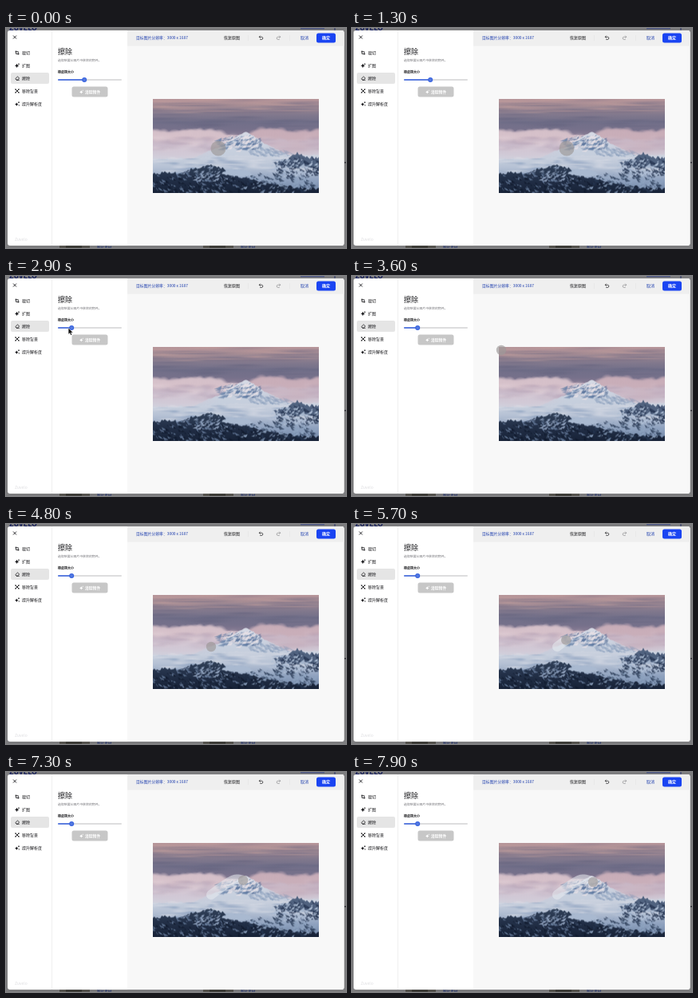
Write an HTML page with a canvas that moves like this. It is 426 px wide and 276 px high and loops after 8000 ms.

```html
<!DOCTYPE html>
<html lang="zh-CN">
<head>
<meta charset="utf-8">
<title>擦除</title>
<style>
html, body { margin: 0; width: 100%; height: 100%; overflow: hidden; background: #7d7d7f; }
canvas { display: block; width: 426px; height: 276px; }
</style>
</head>
<body>
<canvas id="stage"></canvas>
<script>
const W = 426, H = 276, LOOP = 8000, STEP = 100;
const FONT = '"Noto Sans CJK SC", "Noto Sans CJK", "Noto Sans", sans-serif';
const PHOTO = { x: 184, y: 89, w: 208, h: 117.5 };
const INK = '#17171a', BLUE = '#1a44f2', LINK = '#1f3fae';
const scale = Math.max(1, window.devicePixelRatio || 1);

function layer(w, h) {
  const cv = document.createElement('canvas');
  cv.width = w * scale;
  cv.height = h * scale;
  const c = cv.getContext('2d');
  c.scale(scale, scale);
  return c;
}

function random(seed) {
  return () => (seed = (seed * 16807) % 2147483647) / 2147483647;
}

function box(c, x, y, w, h, fill, r = 0) {
  c.fillStyle = fill;
  c.beginPath();
  c.roundRect(x, y, w, h, r);
  c.fill();
}

function disc(c, x, y, r, fill) {
  c.fillStyle = fill;
  c.beginPath();
  c.arc(x, y, r, 0, Math.PI * 2);
  c.fill();
}

function label(c, str, x, y, size, fill, weight = 400) {
  c.font = `${weight} ${size}px ${FONT}`;
  c.textBaseline = 'middle';
  c.fillStyle = fill;
  c.fillText(str, x, y);
}

function lines(c, d, color, width = 0.8) {
  c.strokeStyle = color;
  c.lineWidth = width;
  c.stroke(new Path2D(d));
}

function spark(c, x, y, r, fill) {
  c.save();
  c.translate(x, y);
  c.scale(r, r);
  c.fillStyle = fill;
  c.fill(new Path2D('M0-1Q.2-.2 1 0Q.2.2 0 1Q-.2.2-1 0Q-.2-.2 0-1Z'));
  c.restore();
}

function strip(c, y0, y1, ...colors) {
  const g = c.createLinearGradient(0, y0, 0, y1);
  colors.forEach((col, i) => g.addColorStop(i / (colors.length - 1), col));
  return g;
}

// Soft ellipse; core is the share of the radius that stays solid
function puff(c, x, y, rx, ry, rgb, a, core = 0) {
  c.save();
  c.translate(x, y);
  c.scale(rx, ry);
  const g = c.createRadialGradient(0, 0, core, 0, 0, 1);
  g.addColorStop(0, `rgba(${rgb},${a})`);
  g.addColorStop(1, `rgba(${rgb},0)`);
  c.fillStyle = g;
  c.fillRect(-1, -1, 2, 2);
  c.restore();
}

// Closed shape with ragged edges
function crag(c, pts, rough, fill, rnd) {
  c.fillStyle = fill;
  c.beginPath();
  pts.forEach(([x0, y0], i) => {
    const [x1, y1] = pts[(i + 1) % pts.length];
    const n = Math.max(1, Math.round(Math.hypot(x1 - x0, y1 - y0) / 2));
    for (let k = 0; k < n; k++)
      c.lineTo(x0 + (x1 - x0) * k / n, y0 + (y1 - y0) * k / n + (rnd() - 0.5) * rough);
  });
  c.fill();
}

// Small slanted flakes of rock or snow scattered over an ellipse
function flakes(c, n, x, y, rx, ry, size, fill, slant, rnd) {
  c.fillStyle = fill;
  for (let i = 0; i < n; i++) {
    const a = rnd() * 6.28, d = Math.sqrt(rnd()), s = size * (0.4 + rnd());
    const px = x + Math.cos(a) * d * rx, py = y + Math.sin(a) * d * ry;
    c.beginPath();
    c.moveTo(px, py);
    c.lineTo(px + s * slant, py + s * 0.7);
    c.lineTo(px + s * slant * 0.3, py + s * 0.8);
    c.fill();
  }
}

function paintSky(c, w, rnd) {
  c.fillStyle = strip(c, 0, 48, '#b8969a', '#9f8993', '#83798d', '#716f89', '#77718b', '#8f8299');
  c.fillRect(0, 0, w, 60);
  for (let i = 0; i < 34; i++)
    puff(c, rnd() * w, 1 + rnd() * 16, 22 + rnd() * 38, 1 + rnd() * 2,
      i % 2 ? '206,165,159' : '112,105,130', 0.4);
  for (let i = 0; i < 18; i++)
    puff(c, rnd() * w, 18 + rnd() * 16, 20 + rnd() * 30, 1 + rnd() * 2, '95,95,123', 0.3);
}

function paintClouds(c, w, rnd) {
  c.fillStyle = strip(c, 42, 88, '#c6b0bd', '#cabbca', '#d1cfdb', '#c4cddc');
  c.fillRect(0, 45, w, 45);
  for (let x = -4; x < w + 6; x += 3.5) {
    const dip = 6 * Math.exp(-(((x - 105) / 22) ** 2));
    const top = 43 + dip + Math.sin(x / 13) * 1.8 + rnd() * 3;
    puff(c, x, top, 6 + rnd() * 5, 5 + rnd() * 4, x < 100 ? '214,193,202' : '201,174,185', 0.9, 0.4);
  }
  for (let i = 0; i < 70; i++) {
    const x = rnd() * w;
    puff(c, x, 47 + rnd() * 18, 6 + rnd() * 14, 2 + rnd() * 4,
      i % 2 ? '177,157,178' : x < 110 ? '224,207,214' : '208,185,196', 0.4);
  }
}

function paintPeak(c, rnd) {
  crag(c, [[42, 78], [68, 66], [84, 60], [99, 50], [110, 44], [118, 41], [126, 46], [140, 56],
    [162, 66], [190, 80]], 1.2, strip(c, 41, 80, '#d8dbe6', '#c9d1df', '#c2ccdb'), rnd);
  flakes(c, 70, 107, 53, 25, 8, 5, 'rgba(96,124,164,.55)', -1.6, rnd);
  flakes(c, 45, 123, 53, 16, 9, 4, 'rgba(82,108,149,.55)', -1.2, rnd);
  flakes(c, 40, 112, 53, 25, 10, 4, 'rgba(235,226,231,.7)', -1.7, rnd);
  flakes(c, 40, 145, 66, 28, 8, 5, 'rgba(129,151,184,.5)', 1.8, rnd);
  puff(c, 35, 66, 48, 11, '211,201,214', 0.8);
  puff(c, 182, 60, 42, 11, '200,179,192', 0.85);
}

function paintGround(c, w, rnd) {
  crag(c, [[0, 75], [50, 74], [100, 71], [150, 72], [w, 70], [w, 120], [0, 120]], 2,
    strip(c, 70, 118, '#ced4e0', '#b5c1d4', '#8ea1be', '#6d83a4'), rnd);
  for (let i = 0; i < 60; i++)
    puff(c, rnd() * w, 73 + rnd() * 20, 6 + rnd() * 16, 0.8 + rnd() * 2,
      i % 2 ? '126,149,184' : '223,225,233', 0.5);

  // Rocky shoulder on the right
  crag(c, [[150, 81], [168, 75], [181, 68], [193, 73], [208, 74], [208, 88], [190, 85], [172, 87]],
    4, '#50627f', rnd);
  flakes(c, 90, 183, 84, 32, 13, 5, 'rgba(39,54,81,.75)', 1.2, rnd);
  flakes(c, 90, 178, 84, 32, 12, 4, 'rgba(174,190,212,.8)', -1.2, rnd);

  // Dark foreground on the left, thinning out to the lower right
  crag(c, [[0, 94], [15, 91], [30, 93], [48, 87], [63, 84], [77, 83], [89, 88], [98, 95], [115, 98],
    [132, 104], [155, 107], [185, 111], [208, 112], [208, 120], [0, 120]], 4,
    strip(c, 83, 117, '#304058', '#222f47', '#182338'), rnd);
  flakes(c, 70, 158, 101, 46, 13, 5, 'rgba(39,55,82,.7)', 1.3, rnd);
  flakes(c, 80, 160, 104, 48, 13, 4, 'rgba(143,164,193,.7)', -1.3, rnd);
  flakes(c, 100, 45, 104, 60, 14, 4, 'rgba(122,145,178,.65)', 1.4, rnd);
  flakes(c, 45, 72, 92, 34, 9, 4, 'rgba(159,178,205,.75)', -1.4, rnd);
  flakes(c, 100, 60, 107, 70, 13, 4, 'rgba(18,28,46,.8)', 1.1, rnd);
  crag(c, [[84, 94], [96, 88], [114, 88], [127, 95], [112, 97]], 2, '#a9b9d0', rnd);
}

function paintPhoto() {
  const { w, h } = PHOTO, c = layer(w, h), rnd = random(417);
  paintSky(c, w, rnd);
  paintClouds(c, w, rnd);
  paintPeak(c, rnd);
  paintGround(c, w, rnd);
  return c.canvas;
}

function paintBackdrop(c) {
  box(c, 0, 0, W, H, '#7d7d7f');
  label(c, 'ZUVELO', 4, 0, 9, '#17205c', 800);
  box(c, 369, 0, 30, 1.4, '#4c5684');
  box(c, 411.5, 0, 1, 3, '#26306a');
  for (const x of [67, 247]) {
    box(c, x, 273, 38, 3, '#55534e');
    box(c, x + 8, 273, 20, 3, '#3d3c38');
    label(c, '图片素材', x + 47, 275, 4.6, '#24346f', 500);
  }
  box(c, 424, 168, 2, 1.5, '#34343a');
}

function paintSidebar(c) {
  lines(c, 'M9 9.5L13 13.5M13 9.5L9 13.5', INK, 0.9);
  box(c, 57, 3, 0.8, 270, '#ededed');
  box(c, 6, 56, 48, 14, '#e5e5e5', 2);
  ['裁切', '扩图', '擦除', '移除背景', '提升解析度'].forEach((s, i) =>
    label(c, s, 20, 31 + i * 16, 5, INK, 500));
  lines(c, 'M12.5 28.5V32.5H16.5M11.5 29.7H15.3V33.7', INK);
  spark(c, 13.6, 47.3, 2.6, INK);
  spark(c, 16, 45.2, 1.1, INK);
  lines(c, 'M11.8 63.6L14.5 61L16.7 63L14.3 65.2H13ZM13 65.3H16.8', INK);
  lines(c, 'M12 77L16 81M16 77L12 81', INK, 0.9);
  for (const [x, y] of [[12, 77], [16, 77], [12, 81], [16, 81]]) disc(c, x, y, 0.8, INK);
  spark(c, 13.3, 95.8, 2.2, INK);
  spark(c, 16, 93.2, 1.2, INK);
  spark(c, 16.2, 97, 1, INK);
  label(c, 'Zuvelo', 11, 265, 5, '#dcdcdf', 500);
}

function paintPanel(c) {
  label(c, '擦除', 65, 30, 9, INK, 500);
  label(c, '选取想要从图片中移除的物件。', 65, 41, 3.9, '#77777c');
  label(c, '橡皮擦大小', 65, 55.5, 4, INK, 700);
  box(c, 82.5, 73.5, 45, 13, '#c7c7c7', 2.5);
  spark(c, 94.3, 80.4, 2.1, '#fff');
  spark(c, 96.2, 78.3, 0.9, '#fff');
  label(c, '清除物件', 99, 80, 4.8, '#fff', 700);
}

function paintEditor(c) {
  box(c, 152, 3, 271.5, 270, '#f8f8f8', [0, 3, 3, 0]);
  box(c, 152, 3, 271.5, 19.5, '#efefef', [0, 3, 0, 0]);
  label(c, '目标图片分辨率：3000 x 1687', 163, 12.3, 4.85, LINK, 500);
  label(c, '恢复原图', 273, 12.3, 5, INK, 500);
  box(c, 303, 9, 0.6, 7, '#e2e2e2');
  box(c, 355, 9, 0.6, 7, '#e2e2e2');
  lines(c, 'M318.7 9.7L317.2 11.2L318.7 12.7M317.2 11.2H320.2A1.6 1.6 0 0 1 320.2 14.4H318.2', INK, 0.7);
  lines(c, 'M342.3 9.7L343.8 11.2L342.3 12.7M343.8 11.2H340.8A1.6 1.6 0 0 0 340.8 14.4H342.8', '#8c8c8f', 0.7);
  label(c, '取消', 369, 12.3, 5, LINK, 500);
  box(c, 389, 6.5, 24, 12, BLUE, 2.5);
  label(c, '确定', 396, 12.3, 5, '#fff', 700);
  c.drawImage(paintPhoto(), PHOTO.x, PHOTO.y, PHOTO.w, PHOTO.h);
}

function paintScene() {
  const c = layer(W, H);
  paintBackdrop(c);
  box(c, 2, 3, 421.5, 270, '#fff', 3);
  paintSidebar(c);
  paintPanel(c);
  paintEditor(c);
  return c.canvas;
}

// Pointer stops: time, x, y
const PATH = [
  [0, 266, 151], [400, 269, 151], [1300, 269, 151], [2000, 95, 66], [2300, 95, 66],
  [2900, 79, 66], [3200, 79, 66], [3600, 187, 93], [4100, 257, 154], [4800, 257, 154],
  [6600, 286, 135], [7900, 302, 138], [8000, 302, 138]
];
const DRAG = [2300, 2900], PAINT_START = 4800;

// Speed through a stop; zero when the pointer rests before or after it
function speed(i, axis) {
  const a = PATH[i - 1], b = PATH[i], c = PATH[i + 1];
  const still = (p, q) => p[1] === q[1] && p[2] === q[2];
  if (!a || !c || still(a, b) || still(b, c)) return 0;
  return (c[axis] - a[axis]) / (c[0] - a[0]);
}

function pointer(t) {
  const i = PATH.findIndex((p, k) => k && t <= p[0]);
  const a = PATH[i - 1], b = PATH[i], span = b[0] - a[0];
  const u = (t - a[0]) / span, v = 1 - u;
  return [1, 2].map(k =>
    a[k] * v * v * (1 + 2 * u) + b[k] * u * u * (1 + 2 * v) +
    span * u * v * (speed(i - 1, k) * v - speed(i, k) * u));
}

function drawSlider(c, x) {
  box(c, 65, 64.2, 80, 1.6, '#d2d2d4', 0.8);
  box(c, 65, 64.2, x - 65, 1.6, '#3560df', 0.8);
  disc(c, x, 65, 3, '#3560df');
  disc(c, x, 65, 2, '#5379df');
}

function drawStroke(c, t) {
  if (t <= PAINT_START) return;
  c.beginPath();
  for (let s = PAINT_START; s <= t; s += STEP) c.lineTo(...pointer(s));
  c.lineCap = c.lineJoin = 'round';
  c.lineWidth = 12;
  c.strokeStyle = 'rgba(232,236,241,.55)';
  c.stroke();
}

function drawArrow(c, x, y) {
  c.save();
  c.translate(x - 0.8, y - 0.8);
  const shape = new Path2D('M0 0V7.8L1.8 6.2L3 9L4.4 8.4L3.2 5.7H5.6Z');
  c.fillStyle = '#111';
  c.fill(shape);
  c.strokeStyle = 'rgba(255,255,255,.8)';
  c.lineWidth = 0.4;
  c.stroke(shape);
  c.restore();
}

const view = document.getElementById('stage');
view.width = W * scale;
view.height = H * scale;
const ctx = view.getContext('2d');
ctx.scale(scale, scale);
const scene = paintScene();

function draw(t) {
  const [x, y] = pointer(t);
  const held = pointer(Math.min(DRAG[1], Math.max(DRAG[0], t)))[0];
  ctx.drawImage(scene, 0, 0, W, H);
  drawSlider(ctx, held + 3.2);
  drawStroke(ctx, t);
  if (x >= PHOTO.x && y >= PHOTO.y)
    disc(ctx, x, y, t < DRAG[0] ? 9.5 : 6.2, 'rgba(158,154,153,.68)');
  else
    drawArrow(ctx, x, y);
}

const start = performance.now();
function tick() {
  const t = (performance.now() - start) % LOOP;
  draw(Math.floor(t / STEP) * STEP);
  requestAnimationFrame(tick);
}
tick();
</script>
</body>
</html>
```
